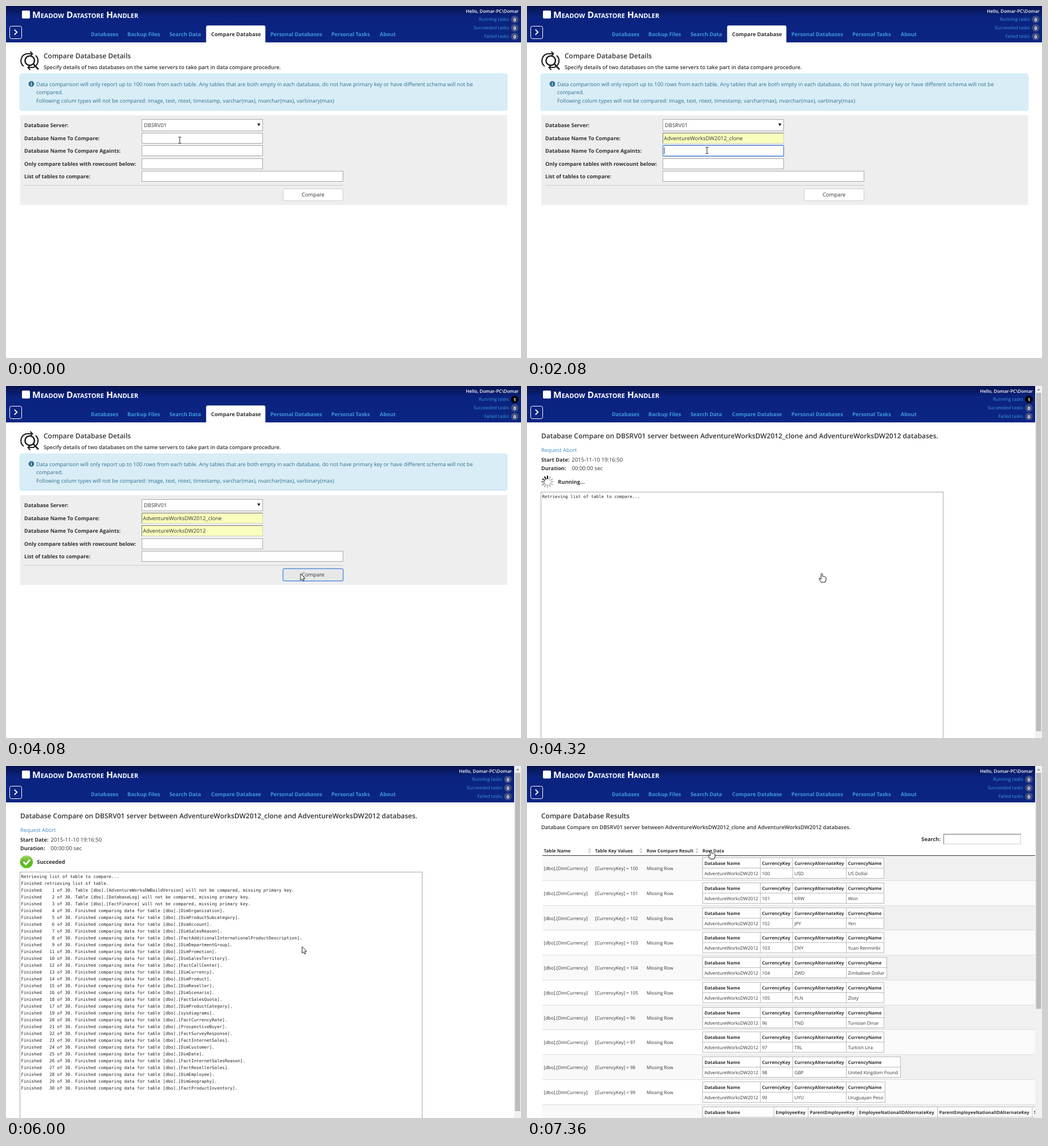
An HTML page that plays this animation: 904 by 619 pixels, repeating every 8 s.

```html
<!DOCTYPE html>
<html lang="en">
<head>
<meta charset="utf-8">
<title>Database compare</title>
<style>
html, body { margin: 0; width: 100%; height: 100%; overflow: hidden; background: #fff; }
svg { display: block; }
text { font-family: "Open Sans", "Noto Sans", sans-serif; white-space: pre; text-rendering: geometricPrecision; }
.mono { font-family: "DejaVu Sans Mono", "Noto Sans Mono", monospace; }
.title { font-variant: small-caps; }
</style>
</head>
<body>
<svg id="stage" width="904" height="619" viewBox="0 0 904 619"></svg>
<script>
const LOOP = 8000, STEP = 80;
const LINK = '#428bca', NAV = '#3f97d9', DARK = '#333', INFO = '#31708f', RING = '#5a8fe0';
const CLONE = 'AdventureWorksDW2012_clone', BASE = 'AdventureWorksDW2012';
const SUMMARY = `Database Compare on DBSRV01 server between ${CLONE} and ${BASE} databases.`;

const text = (x, y, s, size = 9.4, weight = 400, fill = DARK, extra = '') =>
  `<text x="${x}" y="${y}" font-size="${size}" font-weight="${weight}" fill="${fill}" ${extra}>${s}</text>`;
const bold = (x, y, s, size = 9.2, fill = DARK, extra = '') => text(x, y, s, size, 700, fill, extra);
const rect = (x, y, w, h, fill, stroke = 'none', r = 0) =>
  `<rect x="${x}" y="${y}" width="${w}" height="${h}" rx="${r}" fill="${fill}" stroke="${stroke}"/>`;
const path = (d, fill = 'none', stroke = 'none', width = 1, extra = '') =>
  `<path d="${d}" fill="${fill}" stroke="${stroke}" stroke-width="${width}" ${extra}/>`;
const circle = (x, y, r, fill) => `<circle cx="${x}" cy="${y}" r="${r}" fill="${fill}"/>`;
const END = 'text-anchor="end"', MID = 'text-anchor="middle"';

// ---- page header -------------------------------------------------------
const TABS = [[149, 'Databases'], [213, 'Backup Files'], [287, 'Search Data'], [360, 'Compare Database'],
  [464, 'Personal Databases'], [571, 'Personal Tasks'], [656, 'About']];

function header(right, counts, active) {
  let s = rect(0, 0, 904, 64, 'url(#bar)') + rect(28, 8, 14, 14, '#fff', 'none', 2)
    + text(46, 20.5, 'Meadow Datastore Handler', 15.6, 700, '#fff', 'class="title"')
    + rect(6.5, 35.5, 21, 22, 'none', '#fff', 3) + path('M14.8 41.5l4.5 4.5-4.5 4.5', 'none', '#fff', 1.8);
  if (active) s += path('M351.3 64V37.3q0-3 3-3h98q3 0 3 3V64z', '#fff');
  for (const [x, name] of TABS) s += bold(x, 53, name, 9.25, active === name ? DARK : NAV);
  s += text(right, 12, 'Hello, Domar-PC\\Domar', 8, 600, '#fff', END);
  ['Running', 'Succeeded', 'Failed'].forEach((name, i) => {
    const y = 23.5 + 15 * i;
    s += text(right - 17, y + 2, name + ' tasks', 8.15, 400, NAV, END)
      + circle(right - 7, y, 6.6, counts[i] ? '#000' : '#434f80')
      + bold(right - 7, y + 3, counts[i], 8, '#fff', MID);
  });
  return s;
}

const scrollbar = bottom => rect(892, 0, 12, 619, '#f1f1f1') + path('M895 8l3-4 3 4z', '#a3a3a3')
  + rect(893.5, 12, 9, bottom - 12, '#bcbcbc');

// ---- compare form ------------------------------------------------------
function field(y, w, value, focused) {
  let s = rect(238.5, y, w, 18, value ? '#faffbd' : '#fff', value ? '#d5d5c0' : '#a9a9a9');
  if (value) s += path(`M238.5 ${y + 18}V${y}H${238.5 + w}`, 'none', '#777') + text(240.3, y + 12.5, value, 9.45);
  if (focused) {
    s += `<rect x="238.5" y="${y - .5}" width="${w}" height="19" rx="1" fill="none" stroke="${RING}" stroke-width="1.5"/>`;
    if (!value) s += path(`M241 ${y + 3}v12`, 'none', '#000', .8);
  }
  return s;
}

function popup(y, hover) {
  const items = ['TestDB', BASE, CLONE, 'TestDB_clone', 'TestDB_old', 'TestDB2'];
  return rect(239.5, y + .5, 211, 102, '#fff', '#a9a9a9') + items.map((name, i) =>
    (i === hover ? rect(240, y + 1 + 17 * i, 210, 17, '#dcdfe6') : '')
    + text(242, y + 12.5 + 17 * i, name)).join('');
}

function formPage(t) {
  const first = t >= 1200 ? CLONE : '', second = t >= 2640 ? BASE : '';
  const hover = t >= 3760, pressed = t >= 3920;
  let s = header(900, [t >= 4080 ? 1 : 0, 0, 0], 'Compare Database')
    // magnifier with two arrows
    + path('M50 96a8.3 8.3 0 1 1-16.6 0 8.3 8.3 0 0 1 16.6 0M48 102l9 9.5', 'none', '#222', 2.6)
    + path('M31 106a12.5 12.5 0 0 1 5-22h9M52 87a12.5 12.5 0 0 1-4 21h-8', 'none', '#222', 2.2)
    + path('M42.5 80l4 4-4 4.5M42.5 104l-4 4 4 4.5', 'none', '#222', 2)
    + text(66, 92, 'Compare Database Details', 11.98, 600)
    + text(66, 111, 'Specify details of two databases on the same servers to take part in data compare procedure.', 9.28, 600)
    + rect(24.5, 119.5, 855, 64, '#d9edf7', '#bce8f1', 3)
    + circle(44.5, 137, 4.9, INFO) + bold(44.5, 140, 'i', 8, '#fff', MID)
    + text(53, 141, 'Data comparison will only report up to 100 rows from each table. Any tables that are both empty in each database, do not have primary key or have different schema will not be', 9.4, 400, INFO)
    + text(53, 155.3, 'compared.', 9.4, 400, INFO)
    + text(53, 169.5, 'Following colum types will not be compared: image, text, ntext, timestamp, varchar(max), nvarchar(max), varbinary(max)', 9.4, 400, INFO)
    + rect(25, 192, 854.5, 158, '#eee');
  ['Database Server:', 'Database Name To Compare:', 'Database Name To Compare Againts:',
    'Only compare tables with rowcount below:', 'List of tables to compare:']
    .forEach((label, i) => s += bold(32, 213 + 22.6 * i, label));
  s += rect(238.5, 199.5, 212, 20, '#fff', '#a9a9a9') + text(242, 213, 'DBSRV01')
    + path('M441 206.5h5.6l-2.8 5z', '#222')
    + field(223.5, 212, first, t >= 400 && t < 2080)
    + field(245.5, 212, second, t >= 2080 && t < 3920)
    + field(268.5, 212) + field(290.5, 353)
    + path('M32 315.5H592', 'none', '#ccc')
    + rect(486.5, 321.5, 105, 21, hover ? '#e8e8e8' : '#fff', pressed ? RING : hover ? '#adadad' : '#ccc', 2)
    + text(539, 335.3, 'Compare', 9.4, 400, DARK, MID);
  if (pressed) s += rect(486, 321, 106, 22, 'none', RING, 2);
  if (t >= 880 && t < 1680) s += popup(242, t < 1200 ? -1 : t < 1280 ? 1 : 2);
  if (t >= 2400 && t < 3040) s += popup(264, t < 2640 ? -1 : t < 2720 ? 0 : 1);
  return s;
}

// ---- task log ----------------------------------------------------------
const SKIPPED = ['AdventureWorksDWBuildVersion', 'DatabaseLog', 'FactFinance'];
const TABLES = ('DimOrganization DimProductSubcategory DimAccount DimSalesReason FactAdditionalInternationalProductDescription '
  + 'DimDepartmentGroup DimPromotion DimSalesTerritory FactCallCenter DimCurrency DimProduct DimReseller DimScenario '
  + 'FactSalesQuota DimProductCategory sysdiagrams FactCurrencyRate ProspectiveBuyer FactSurveyResponse FactInternetSales '
  + 'DimCustomer DimDate FactInternetSalesReason FactResellerSales DimEmployee DimGeography FactProductInventory').split(' ');
const SWAPPED = { 10: 11, 11: 10, 17: 18, 18: 17 };
const LOG = ['Retrieving list of table to compare...', 'Finished retrieving list of table.',
  ...[...SKIPPED, ...TABLES].map((name, i) => {
    const n = SWAPPED[i + 1] || i + 1, start = `Finished${String(n).padStart(5)} of 30. `;
    return start + (i < 3 ? `Table [dbo].[${name}] will not be compared, missing primary key.`
      : `Finished comparing data for table [dbo].[${name}].`);
  })];

function spinner(t) {
  const head = Math.round((t - 4320) / STEP);
  let s = '';
  for (let i = 0; i < 12; i++) {
    const age = (((head - i) % 12) + 12) % 12, tone = Math.min(190, age * 36);
    s += `<path d="M0-5.8V-10" transform="translate(36 168.5) rotate(${i * 30})" stroke="rgb(${tone},${tone},${tone})" stroke-width="2.2" stroke-linecap="round"/>`;
  }
  return s;
}

const check = circle(36, 168.5, 11.3, 'url(#ok)') + path('M30.5 168.5l4.3 4.5 7.2-8', 'none', '#fff', 3.2);

function logPage(t) {
  const done = t >= 6000, ended = t >= 5040;
  return header(888, [ended ? 0 : 1, ended && !done ? 1 : 0, 0]) + scrollbar(607)
    + text(25, 92, SUMMARY, 11.98, 600)
    + text(25, 116, 'Request Abort', 9.4, 400, LINK)
    + bold(25, 133.3, 'Start Date:') + text(78.5, 133.3, '2015-11-10 19:16:50', 9.5)
    + bold(25, 147.5, 'Duration:') + text(78.5, 147.5, '00:00:00 sec', 9.5)
    + (done ? check : spinner(t)) + bold(54.3, 172.3, done ? 'Succeeded' : 'Running...', 9.4)
    + rect(24.5, 186.5, 706, 450, '#fff', '#a9a9a9')
    + LOG.slice(0, done ? 32 : 1).map((line, i) => text(26.5, 197 + 12 * i, line, 7.53, 400, '#222', 'class="mono"')).join('');
}

// ---- results -----------------------------------------------------------
const MONEY = [[100, 'USD', 'US Dollar'], [101, 'KRW', 'Won'], [102, 'JPY', 'Yen'], [103, 'CNY', 'Yuan Renminbi'],
  [104, 'ZWD', 'Zimbabwe Dollar', 631], [105, 'PLN', 'Zloty'], [96, 'TND', 'Tunisian Dinar'], [97, 'TRL', 'Turkish Lira'],
  [98, 'GBP', 'United Kingdom Pound', 655], [99, 'UYU', 'Uruguayan Peso', 628]];
const MONEY_HEAD = ['Database Name', 'CurrencyKey', 'CurrencyAlternateKey', 'CurrencyName'];
const STAFF_HEAD = ['Database Name', 'EmployeeKey', 'ParentEmployeeKey', 'EmployeeNationalIDAlternateKey',
  'ParentEmployeeNationalIDAlternateKey', 'SalesTerritoryKey'];

function grid(y, edges, head, cells) {
  const left = edges[0], right = edges[edges.length - 1];
  return rect(left, y, right - left, 36, '#fff', '#bbb') + path(`M${left} ${y + 18}H${right}`, 'none', '#bbb')
    + edges.slice(1, -1).map(x => path(`M${x} ${y}v36`, 'none', '#bbb')).join('')
    + head.map((h, i) => bold(edges[i] + 3, y + 12.3, h, 7.87)).join('')
    + cells.map((c, i) => text(edges[i] + 3, y + 30.5, c, 8.08)).join('');
}

function sortIcon(x, up) {
  return up ? path(`M${x - 3} 148.5l3-4.5 3 4.5z`, '#3d8fd0')
    : path(`M${x - 2.7} 148l2.7-4 2.7 4zM${x - 2.7} 149.7l2.7 4 2.7-4z`, '#ccc');
}

function resultPage(t) {
  const resorted = t >= 7360, [from, to] = resorted ? [306, 892] : [27, 116];
  let s = text(25, 92, 'Compare Database Results', 11.98, 600) + text(25, 111, SUMMARY, 9.33, 600)
    + bold(692.3, 132, 'Search:', 9.3) + rect(731.5, 120, 135, 17, '#fff', '#ccc')
    + path('M731.5 137.5V120H867', 'none', '#777');
  for (let i = 0; i < 11; i++) {
    const y = 158 + 43.77 * i, odd = i % 2 === 0, base = y + 25, line = MONEY[i];
    if (odd) s += rect(27, y, 865, 43.77, '#f9f9f9');
    s += rect(from, y, to - from, 43.77, odd ? '#f0f0f0' : '#fafafa');
    if (i) s += path(`M27 ${Math.round(y) - .5}H892`, 'none', '#ddd');
    const top = Math.round(y + 3) + .5;
    if (!line) {
      s += grid(599.5, [308.5, 433.5, 493.5, 579.8, 720.5, 886.8, 960], STAFF_HEAD, []);
      continue;
    }
    const [key, code, name, right = 626] = line;
    s += text(29.5, base, '[dbo].[DimCurrency]', 8.08) + text(119.5, base, `[CurrencyKey] = ${key}`, 8.08)
      + text(210, base, 'Missing Row', 8.08)
      + grid(top, [308.5, 409.5, 466.5, 560.5, right + .5], MONEY_HEAD, [BASE, key, code, name]);
  }
  [[29.5, 'Table Name'], [119.5, 'Table Key Values'], [210, 'Row Compare Result'], [308, 'Row Data']]
    .forEach(([x, name]) => s += bold(x, 151.5, name, 8));
  return s + sortIcon(109.7, !resorted) + sortIcon(200, false) + sortIcon(298.3, false)
    + path('M27 157.5H892', 'none', '#333', 1.2) + header(888, [0, 0, 0]) + scrollbar(427);
}

// ---- pointer -----------------------------------------------------------
const TRACK = [[0, 305, 236], [1040, 305, 236], [1360, 300, 284], [1600, 300, 284], [2000, 316, 254], [2480, 316, 254],
  [2800, 314, 285], [3040, 314, 285], [3840, 517, 330], [4160, 517, 330], [4240, 517.5, 330], [5040, 517.5, 330],
  [5200, 519.7, 317.7], [6480, 519.7, 317.7], [7200, 322.7, 148.5], [8000, 322.7, 148.5]];
const SHAPES = {
  arrow: path('M0 0V11.5L2.7 9.2 4.5 13 6.3 12.2 4.6 8.4H8Z', '#fff', '#111', .9),
  hand: path('M-1.3 1Q0-.8 1.3 1V5.5Q3 4.6 3.6 6 5.4 5.4 6 6.8 7.4 6.6 7.4 8.2V11.5L6 15.7H-1.2L-4.4 10.5Q-5.4 8.4-3.4 8.6L-1.3 10.4Z',
    '#fff', '#111', 1, 'transform="translate(0 -.6)"'),
  beam: path('M-2.5-5.5H-.6L0-5 .6-5.5H2.5M0-5V5M-2.5 5.5H-.6L0 5 .6 5.5H2.5', 'none', '#222', 1)
};

function pointer(t) {
  const i = TRACK.findIndex(k => k[0] > t), [t0, x0, y0] = TRACK[i - 1], [t1, x1, y1] = TRACK[i];
  const p = (t - t0) / (t1 - t0), e = p * p * (3 - 2 * p);
  const kind = t < 1120 || (t >= 1680 && t < 2560) ? 'beam'
    : (t >= 4240 && t < 5120) || t >= 7200 ? 'hand' : 'arrow';
  return `<g transform="translate(${x0 + (x1 - x0) * e} ${y0 + (y1 - y0) * e})">${SHAPES[kind]}</g>`;
}

// ---- playback ----------------------------------------------------------
const stops = list => list.map(([at, c]) => `<stop offset="${at}" stop-color="${c}"/>`).join('');
const DEFS = `<defs><linearGradient id="bar" x2="0" y2="1">${stops([[0, '#07124e'], [.3, '#0b237f'], [1, '#0b2583']])}</linearGradient>
<linearGradient id="ok" x2="0" y2="1">${stops([[0, '#a5d86e'], [.5, '#5fb52a'], [1, '#55c814']])}</linearGradient></defs>`;
const stage = document.getElementById('stage');
let shown = -1;

function draw(now) {
  const t = Math.floor(now % LOOP / STEP) * STEP;
  if (t !== shown) {
    shown = t;
    const page = t < 4240 ? formPage : t < 6160 ? logPage : resultPage;
    stage.innerHTML = DEFS + page(t) + pointer(t);
  }
  requestAnimationFrame(draw);
}
draw(performance.now());
</script>
</body>
</html>
```
